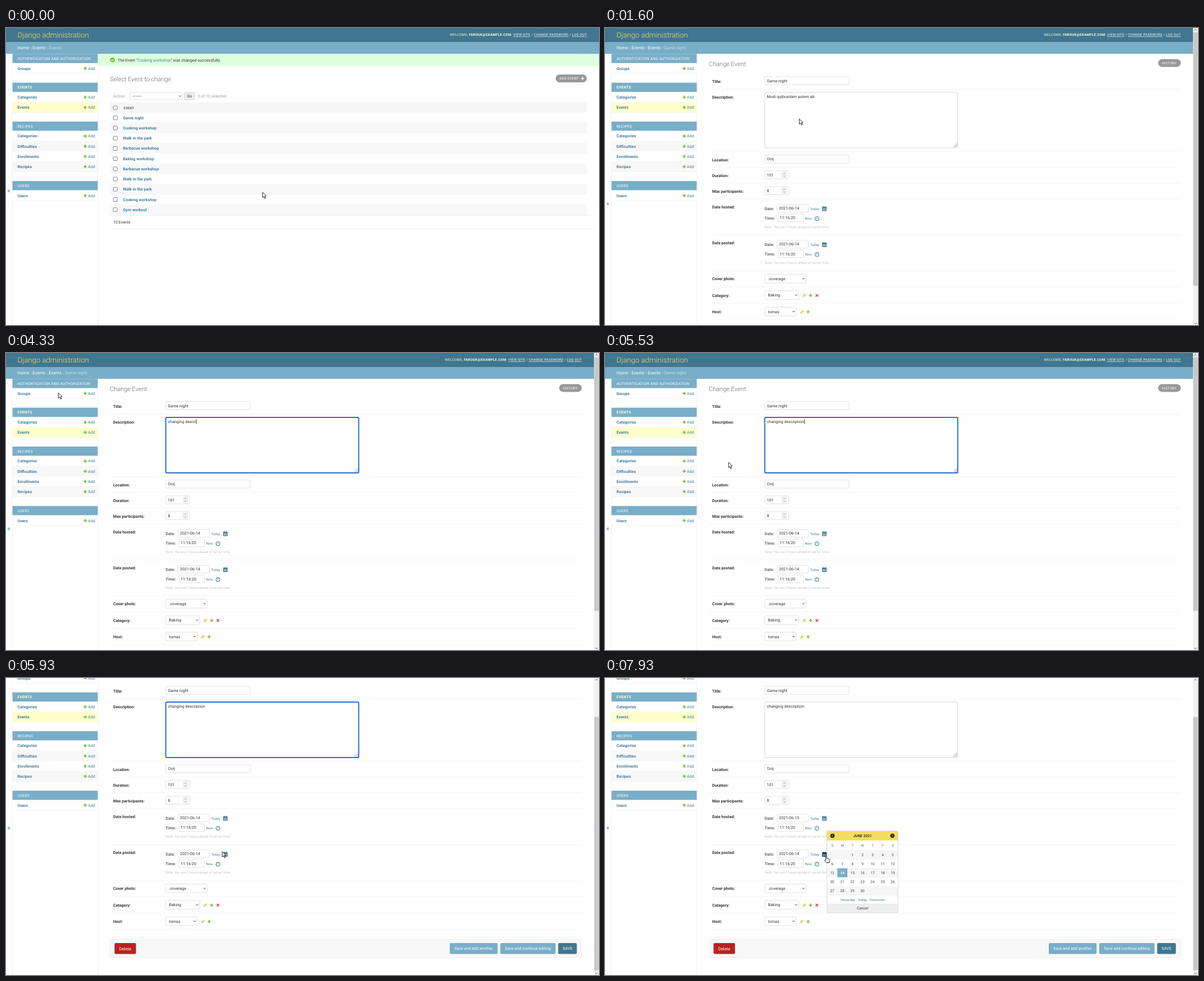
Write an HTML page that moves like this. It is 1057x530 px and loops after 8 s.

```html
<!DOCTYPE html>
<html lang="en">
<head>
<meta charset="utf-8">
<title>Admin event form</title>
<style>
html, body { margin: 0; width: 100%; height: 100%; overflow: hidden; background: #fff; }
svg { display: block; width: 100%; height: 100%; font-family: Roboto, Arial, sans-serif; text-rendering: geometricPrecision; }
text { white-space: pre; }
</style>
</head>
<body>
<svg id="stage" viewBox="0 0 1057 530" xmlns="http://www.w3.org/2000/svg"></svg>
<script>
const LINK = '#447e9b', BLUE = '#79aec8', DARK = '#417690', GREEN = '#70bf2b', PALE = '#f8f8f8', LINE = '#eee';
const BASE = 7.157, SMALL = 6.056, MID = 6.606;
const BOLD = 'font-weight="700"', CENTER = 'text-anchor="middle"', SPACED = 'letter-spacing=".275"';
const LOOP = 8000;

// Drawing helpers; text is placed by its vertical centre.
const rect = (x, y, w, h, fill, extra = '') => `<rect x="${x}" y="${y}" width="${w}" height="${h}" fill="${fill}" ${extra}/>`;
const box = (x, y, w, h, stroke = '#ccc', fill = '#fff', r = 2, extra = '') =>
  rect(x + .28, y + .28, w - .56, h - .56, fill, `rx="${r}" stroke="${stroke}" stroke-width=".6" ${extra}`);
const text = (x, y, s, fill = '#333', size = BASE, extra = '') =>
  `<text x="${x}" y="${y + size * .355}" font-size="${size}" fill="${fill}" ${extra}>${s}</text>`;
const path = (d, stroke, w = 1, extra = '') => `<path d="${d}" fill="none" stroke="${stroke}" stroke-width="${w}" ${extra}/>`;
const rule = (x, y, x2, c = LINE) => path(`M${x} ${y}H${x2}`, c, .6);
const group = (id, s, extra = '') => `<g id="${id}" ${extra}>${s}</g>`;
const plus = (x, y, c = GREEN, r = 2.9) => path(`M${x - r} ${y}h${2 * r}M${x} ${y - r}v${2 * r}`, c, 1.7);
const cross = (x, y) => path(`M${x - 2.2} ${y - 2.2}l4.4 4.4m0-4.4l-4.4 4.4`, '#dd4646', 1.5);
const pencil = (x, y) => path(`M${x - 2.6} ${y + 2.6}l1.2-1.2`, '#c99a2c', 1) + path(`M${x - 1.9} ${y + 1.9}l4.2-4.2`, '#efb80b', 2);
const chevron = (x, y) => path(`M${x - 2} ${y - 1}l2 2 2-2`, '#333', 1);
const select = (x, y, w, h, label, tx) => box(x, y, w, h) + text(tx, y + h / 2, label) + chevron(x + w - 5, y + h / 2);
const input = (y, w, value) => box(284.5, y, w, 15) + text(288.5, y + 7.5, value);
const label = (y, s) => text(191, y, s, '#333', BASE, BOLD);
const button = (x, w, s, fill, size = BASE) =>
  rect(x, 545, w, 19.5, fill, 'rx="2.2"') + text(x + w / 2, 554.8, s, '#fff', size, CENTER);
const pill = (x, y, w, s, tx) => rect(x, y, w, 14, '#999', 'rx="7"') + text(tx, y + 7, s, '#fff', SMALL, SPACED);

function header() {
  const link = s => `<tspan fill="#fff" text-decoration="underline">${s}</tspan>`;
  const tools = `WELCOME, <tspan ${BOLD}>FAROUK@EXAMPLE.COM</tspan>. ` +
    ['VIEW SITE', 'CHANGE PASSWORD', 'LOG OUT'].map(link).join(' / ');
  return rect(0, 0, 1057, 25.6, DARK) + rect(0, 25.6, 1057, 20.4, BLUE) +
    text(20.5, 12.4, 'Django administration', '#f5dd5d', 13.21, 'font-weight="300"') +
    group('tools', text(1035.3, 12, tools, '#ffc', SMALL, `${SPACED} text-anchor="end"`));
}

function crumbs(names) {
  const last = names.pop();
  const s = names.map(n => `<tspan fill="#fff">${n}</tspan> › `).join('') + last;
  return text(20.5, 35.5, s, '#c4dce8', 7.707);
}

function sidebar() {
  const apps = [
    [54.4, 'AUTHENTICATION AND AUTHORIZATION', ['Groups']],
    [105.8, 'EVENTS', ['Categories', 'Events']],
    [175.2, 'RECIPES', ['Categories', 'Difficulties', 'Enrollments', 'Recipes']],
    [281.3, 'USERS', ['Users']]
  ];
  let s = path('M11.3 46V602M163.8 46V602', '#e4e4e4', .6);
  for (const [y, name, models] of apps) {
    const current = name === 'EVENTS';
    s += rect(11.6, y - 8.2, 151.9, 16.4, BLUE) +
      text(20.5, y, name, current ? '#ffc' : '#fff', MID, SPACED + (current ? BOLD : ''));
    models.forEach((m, i) => {
      const c = y + 17.7 + 18.17 * i;
      const fill = m === 'Events' ? '#ffc' : i % 2 ? PALE : '#fff';
      s += rect(11.6, c - 9.1, 151.9, 18.2, fill) + rule(11.6, c + 9, 163.5) +
        text(20.5, c, m, LINK, BASE, BOLD) + plus(141.2, c) + text(146.1, c, 'Add', LINK);
    });
  }
  return s + group('toggle', text(5, 0, '«', LINK, 12, CENTER));
}

function listPage() {
  const names = ['Game night', 'Cooking workshop', 'Walk in the park', 'Barbecue workshop', 'Baking workshop',
    'Barbecue workshop', 'Walk in the park', 'Walk in the park', 'Cooking workshop', 'Gym workout'];
  const check = y => box(191, y - 3.7, 7.5, 7.5, '#777783', '#fff', 1.1, 'style="stroke-width:.9"');
  let s = crumbs(['Home', 'Events', 'Events']) + rect(164, 46, 893, 21.7, '#dfd') +
    `<circle cx="189.8" cy="57" r="4.2" fill="${GREEN}"/>` + path('M187.7 57l1.5 1.6 2.8-3.1', '#fff', 1.1) +
    text(199, 57, `The Event “<tspan fill="${LINK}">Cooking workshop</tspan>” was changed successfully.`) +
    text(185, 91.3, 'Select Event to change', '#666', 11.01, 'font-weight="300"') +
    pill(979.7, 83, 55.5, 'ADD EVENT', 986.5) + plus(1027.7, 90, '#fff', 2.7) +
    text(191, 121.3, 'Action:', '#999') + select(220.5, 114.7, 94.8, 13.4, '---------', 224.5) +
    box(318, 114.7, 18.3, 13.4, '#bbb', '#efefef') + text(327.1, 121.4, 'Go', '#333', BASE, CENTER) +
    text(342, 121.3, '0 of 10 selected', '#999') +
    rect(185, 133.5, 850.3, 17.6, '#f6f6f6') + rule(185, 133.6, 1035.3) + rule(185, 151.1, 1035.3) +
    check(142.4) + text(209.5, 142.6, 'EVENT', '#666', SMALL, BOLD);
  names.forEach((n, i) => {
    const y = 160.2 + 18.22 * i;
    s += rect(185, y - 9, 850.3, 18.2, i % 2 ? PALE : '#fff') + rule(185, y + 9.1, 1035.3) + check(y) +
      text(208.5, y, n, LINK, BASE, BOLD + (i ? '' : ' id="first"'));
  });
  return s + rule(185, 334.3, 1046.5, '#e2e2e2') + text(191, 346, '10 Events') + rule(185, 358, 1046.5);
}

function spinner(y) {
  return box(315, y, 9.5, 11, '#ddd', '#f2f2f2', 1) +
    path(`M318 ${y + 4}l1.7-1.7 1.7 1.7M318 ${y + 7}l1.7 1.7 1.7-1.7`, '#777', .7);
}

function dateField(i) {
  const y = 322 + 64.1 * i;
  const icon = rect(387, y - 3, 8, 7.8, 'currentColor', 'rx=".8"') +
    path(`M389 ${y - 4.2}v2M393 ${y - 4.2}v2`, 'currentColor', 1.1) +
    path(`M387.8 ${y + .7}h6.5M387.8 ${y + 2.7}h6.5M389.6 ${y - .6}v4.6M392.2 ${y - .6}v4.6`, '#fff', .5);
  return label(y - 2.4, i ? 'Date posted:' : 'Date hosted:') +
    text(284.5, y + .4, 'Date:', '#666', BASE, BOLD) +
    box(306.3, y - 7.4, 56.4, 14.4, '#ccc', '#fff', 2, `id="date${i}"`) +
    text(310, y - .3, '2021-06-14', '#333', BASE, `id="value${i}"`) +
    text(365.5, y + .7, 'Today', LINK, SMALL) + text(383.6, y + .5, '|', '#ddd', SMALL) + group('icon' + i, icon, `color="${LINK}"`) +
    text(284.5, y + 17.5, 'Time:', '#666', BASE, BOLD) +
    box(308, y + 9.8, 46, 14.4) + text(311.5, y + 16.9, '11:16:20') +
    text(356.5, y + 18, 'Now', LINK, SMALL) + text(370.9, y + 17.8, '|', '#ddd', SMALL) +
    `<circle cx="377.8" cy="${y + 18.2}" r="3.4" fill="#fff" stroke="${LINK}" stroke-width="1.1"/>` +
    path(`M377.8 ${y + 16}v2.3l-1.4 1.2`, LINK, .8) +
    text(284.5, y + 32.8, 'Note: You are 2 hours ahead of server time.', '#c4c4c4', SMALL);
}

function squiggle(x, x2) {
  return path(`M${x} 126.2` + 'q.5-1 1 0t1 0'.repeat(Math.floor((x2 - x) / 2)), '#e0405c', .5);
}

function formPage() {
  const lines = [109.3, 220.6, 248.7, 276.8, 305, 369.2, 433.4, 462, 491.6, 520.8];
  return crumbs(['Home', 'Events', 'Events', 'Game night']) +
    text(185, 63.6, 'Change Event', '#666', 11.01, 'font-weight="300"') + pill(986, 55.4, 40.2, 'HISTORY', 992.5) +
    lines.map(y => rule(185, y, 1026.3)).join('') +
    label(95.2, 'Title:') + input(86.5, 151, 'Game night') +
    label(123.5, 'Description:') + box(284.5, 114.5, 344.5, 99.7, '#bbb', '#fff', 2, 'id="area"') +
    path('M620.8 212.5l7-7M623.4 212.5l4.4-4.4M625.8 212.5l2-2', '#777', .7) +
    rect(288.3, 118, 0, 9, '#3390ff', 'id="mark"') +
    text(288.5, 122.4, '', '#333', BASE, 'id="desc"') +
    group('spell', squiggle(289, 304) + squiggle(307, 341) + squiggle(344, 363) + squiggle(366, 374)) +
    rect(0, 118, .7, 9, '#111', 'id="caret"') +
    label(235, 'Location:') + input(226.4, 151, 'Ooij') +
    label(263, 'Duration:') + input(254.5, 43.5, '101') + spinner(256.5) +
    label(291, 'Max participants:') + input(282.7, 43.5, '8') + spinner(284.7) +
    dateField(0) + dateField(1) +
    label(447.5, 'Cover photo:') + select(284.5, 439.3, 74.3, 16.2, '.coverage', 290.5) +
    label(477, 'Category:') + select(284.5, 468.6, 61.2, 16.2, 'Baking', 290.5) +
    pencil(355.2, 477.3) + plus(366.5, 477.3, GREEN, 2.7) + cross(377.7, 477.3) +
    label(506.2, 'Host:') + select(284.5, 497.9, 56.7, 16.2, 'tomas', 290.5) +
    pencil(350.8, 506.5) + plus(362, 506.5, GREEN, 2.7) +
    box(185, 538, 841.3, 33.5, '#e8e8e8', PALE) +
    button(193.5, 38.2, 'Delete', '#ba2121', 7.707) + button(791, 85.3, 'Save and add another', BLUE) +
    button(881, 98.6, 'Save and continue editing', BLUE) + button(984.2, 33.3, 'SAVE', DARK) +
    calendar(0) + calendar(1);
}

function calendar(i) {
  const cx = c => 9.6 + 17.98 * c, cy = r => 42.3 + 16.1 * r;
  const cell = (c, r, fill) => rect(cx(c) - 8.9, cy(r) - 8, 17.8, 16, fill);
  const arrow = (x, d) => `<circle cx="${x}" cy="8.5" r="3.8" fill="#222"/>` +
    path(`M${x - d * .8} 6.6l${d * 1.8} 1.9 ${-d * 1.8} 1.9`, '#f5dd5d', 1);
  const day = (d, fill = '#444', extra = '') =>
    text(cx((d + 1) % 7), cy(Math.floor((d + 1) / 7)), d, fill, MID, `${CENTER} ${extra}`);
  let s = rect(-.6, -.6, 128.2, 146.8, '#000', 'opacity=".1" rx="2"') + box(0, 0, 127, 145.6, '#ccc', '#fff', 1.5) +
    rect(.4, .3, 126.2, 16.5, '#f5dd5d') + text(63.5, 8.5, 'JUNE 2021', '#333', MID, `${CENTER} ${BOLD}`) +
    arrow(10, -1) + arrow(116.8, 1);
  [...'SMTWTFS'].forEach((c, k) => s += text(cx(k), 25.4, c, '#666', SMALL, CENTER));
  for (let r = 0; r < 5; r++) s += rect(.5, cy(r) - 8, 126, 16.1, r % 2 ? '#fff' : '#f6f6f6') + rule(.5, cy(r) - 8, 126.5);
  s += cell(1, 2, BLUE);
  for (let d = 1; d <= 30; d++) s += d === 14 ? day(d, '#fff', BOLD) : day(d);
  s += group('hover' + i, cell(2, 2, DARK) + day(15, '#fff')) + rule(.5, cy(5) - 8, 126.5) +
    text(63.5, 122.3, 'Yesterday <tspan fill="#ccc">|</tspan> Today <tspan fill="#ccc">|</tspan> Tomorrow', LINK, SMALL, CENTER) +
    rect(.5, 130.2, 126, 14.9, '#eee') + rule(.5, 130.2, 126.5, '#ddd') + text(63.5, 137.3, 'Cancel', '#333', MID, CENTER);
  return group('cal' + i, s, `transform="translate(395.5 ${281 + 64.1 * i})"`);
}

function overlay() {
  const ink = 'fill="#fff" stroke="#000" stroke-width=".85" stroke-linejoin="round"';
  return group('bar', rect(1048, 0, 9, 530, '#f1f1f1') + rect(1048.4, 8, 8.2, 452, '#c8c8c8', 'id="thumb"') +
      path('M1050.4 4.4l2.1-2.1 2.1 2.1M1050.4 526l2.1 2.1 2.1-2.1', '#555', 1)) +
    group('status', rect(0, 521, 144, 9, '#2b2b2b') + text(.5, 527, '127.0.0.1', '#fff', 6.2)) +
    group('cursor',
      group('arrow', `<path d="M.3 .2V9.6L2.6 7.7 4.2 11.3 5.8 10.6 4.2 7.1 7 6.8z" ${ink}/>`) +
      group('hand', `<path d="M-.9 .8Q0-.4 .9 .8V4.6L5.4 5.7Q6.7 6.2 6.4 8L5.7 12.2H.4L-2.6 8.3Q-2.6 6.7-.9 7.7z" ${ink}/>`) +
      group('beam', path('M-2-4.8Q0-4.8 0-3.8Q0-4.8 2-4.8M0-4V4M-2 4.8Q0 4.8 0 3.8Q0 4.8 2 4.8', '#222', .9)));
}

document.getElementById('stage').innerHTML =
  group('page', header() + group('list', listPage()) + group('form', formPage()) + sidebar()) + overlay();
const el = {};
document.querySelectorAll('[id]').forEach(e => el[e.id] = e);
// Popups lie above everything else on the page.
el.page.append(el.cal0, el.cal1);

const TRACK = [[0, 457, 293], [400, 345, 220], [800, 242, 161], [870, 240, 160], [1130, 240, 160], [1200, 252.7, 168.2],
  [1470, 312, 176], [1730, 380, 148], [2000, 379, 124], [2070, 374, 123], [2330, 93, 71], [5330, 93, 71],
  [5530, 220, 195], [5730, 345, 315], [5800, 362, 323], [5930, 385, 309.5], [6130, 391, 265], [6330, 392, 253],
  [6470, 394, 255], [6800, 425, 274], [7070, 441, 285], [7130, 442, 283], [7270, 442, 283.5], [7530, 415, 303],
  [7800, 394.3, 317.4], [7930, 394.3, 317.4]];
const SCROLL = [[5730, 0], [5800, 17.6], [5870, 50], [5930, 72]];
const SHAPE = [[0, 'arrow'], [730, 'hand'], [1330, 'arrow'], [1930, 'beam'], [2200, 'arrow'], [5530, 'arrow'],
  [5800, 'beam'], [5870, 'arrow'], [6270, 'hand'], [6470, 'arrow'], [6800, 'hand'], [7330, 'arrow'], [7730, 'hand']];
const NEW_TEXT = 'changing description';
const KEYS = [2800, 2930, 3070, 3130, 3270, 3330, 3470, 3530, 3670, 3730, 3800, 3930, 4070, 4200, 4330, 4530, 4600, 4730, 4800, 4930];

function at(keys, t) {
  const n = keys.findIndex(k => k[0] > t);
  if (n === 0) return keys[0].slice(1);
  if (n < 0) return keys[keys.length - 1].slice(1);
  const a = keys[n - 1], b = keys[n], p = (t - a[0]) / (b[0] - a[0]);
  return a.slice(1).map((v, i) => v + (b[i + 1] - v) * p);
}
const show = (id, on) => el[id].style.display = on ? '' : 'none';
const set = (id, name, v) => el[id].setAttribute(name, v);
function focus(id, on, idle) {
  set(id, 'stroke', on ? '#0f5bc8' : idle);
  set(id, 'stroke-width', on ? 1.7 : .6);
}

function draw(now) {
  const t = Math.round(Math.floor((now % LOOP + 5) * .015) * 20 / 3) * 10 % LOOP;
  const form = t >= 1400;
  const [x, y] = at(TRACK, t), [scroll] = at(SCROLL, t);

  show('list', !form);
  show('form', form);
  show('bar', form);
  show('status', t >= 800 && !form);
  set('tools', 'transform', `translate(${form ? -9 : 0} 0)`);
  set('page', 'transform', `translate(0 ${-scroll})`);
  set('thumb', 'y', 8 + scroll * .855);
  set('toggle', 'transform', `translate(0 ${form ? scroll + 266.5 + Math.max(46.5 - scroll, 0) : 289.5})`);
  set('first', 'fill', t >= 870 ? '#036' : LINK);
  set('first', 'text-decoration', t >= 1000 ? 'underline' : 'none');

  const typed = KEYS.filter(k => k <= t).length;
  const marked = t >= 2070 && !typed;
  el.desc.textContent = typed ? NEW_TEXT.slice(0, typed) : 'Modi quibusdam autem ab.';
  set('desc', 'fill', marked && x < 300 ? '#fff' : '#333');
  const from = Math.min(376, Math.max(288.3, x));
  set('mark', 'x', from);
  set('mark', 'width', marked ? 376 - from : 0);
  show('spell', marked);
  show('caret', typed && t < 5870);
  if (typed) set('caret', 'x', 288.5 + el.desc.getComputedTextLength());
  focus('area', t >= 2070 && t < 6330, '#bbb');

  el.value0.textContent = t >= 7270 ? '2021-06-15' : '2021-06-14';
  focus('date0', t >= 7270 && t < 7800, '#ccc');
  el.icon0.style.color = t >= 6270 && t < 6470 ? '#036' : LINK;
  el.icon1.style.color = t >= 7730 ? '#036' : LINK;
  show('cal0', t >= 6400 && t < 7270);
  show('hover0', t >= 7000);
  show('cal1', t >= 7870);
  show('hover1', false);

  const shape = SHAPE.filter(k => k[0] <= t).pop()[1];
  for (const s of ['arrow', 'hand', 'beam']) show(s, s === shape);
  set('cursor', 'transform', `translate(${x} ${y})`);
}

const start = performance.now();
function tick() {
  draw(performance.now() - start);
  requestAnimationFrame(tick);
}
tick();
</script>
</body>
</html>
```
